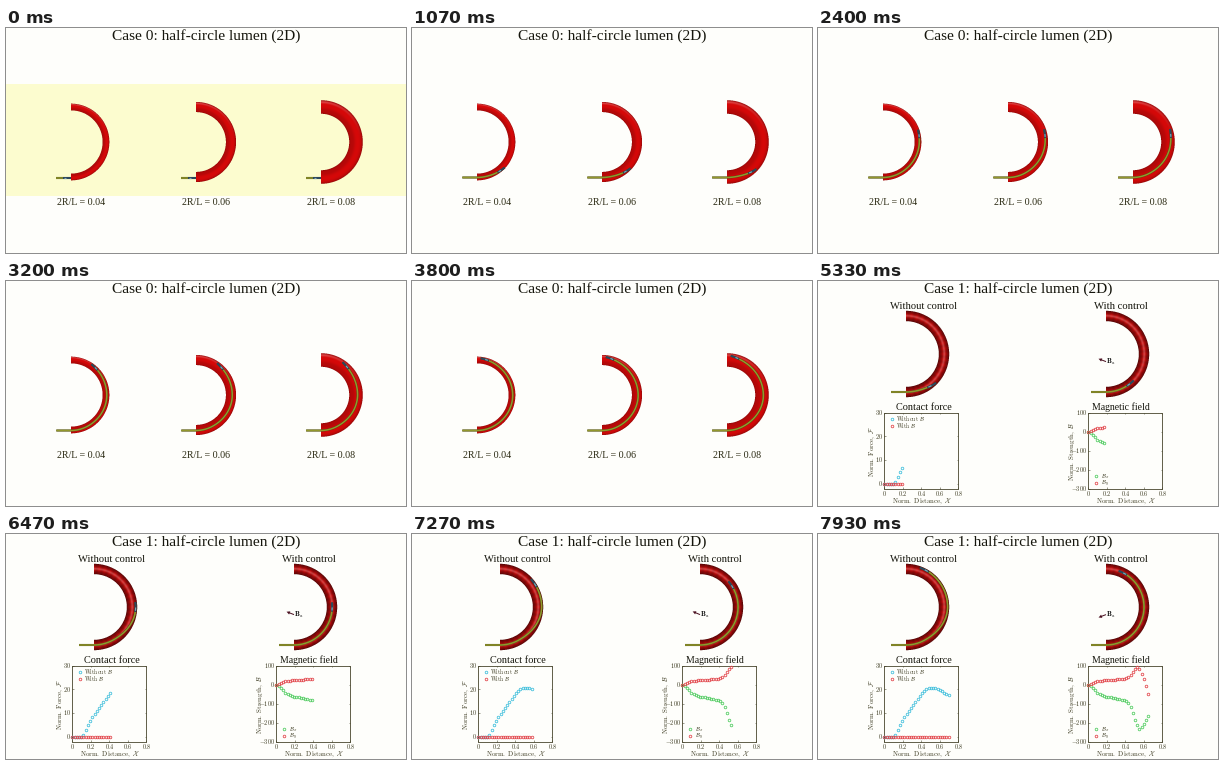
These frames come from a looping animation (400 px wide and 225 px high, 8 s). A matplotlib script:

```python
import numpy as np
import matplotlib.pyplot as plt
from matplotlib.animation import FuncAnimation
from matplotlib.patches import Polygon, Rectangle

W, H = 400, 225
PX = 0.72                      # points per pixel at 100 dpi
LOOP, STEP = 8000, 50
CUT = 4250                     # second case starts here
BG, INK, AXIS = "#fefefb", "#15150c", "#3d3b22"
OLIVE, TIP, LIGHT = "#93982c", "#2b4660", "#7aa6b4"
CYAN, RED, GREEN = "#40bfdc", "#e2474d", "#52cc62"

plt.rcParams["mathtext.fontset"] = "cm"
fig = plt.figure(figsize=(W / 100, H / 100), dpi=100, facecolor=BG)
ax = fig.add_axes([0, 0, 1, 1])
ax.set_xlim(0, W)
ax.set_ylim(H, 0)
ax.axis("off")


def keep(group, artist):
    group.append(artist)
    return artist


def text(group, x, y, s, size, ha="center", color=INK, **kw):
    kw.setdefault("va", "baseline")
    return keep(group, ax.text(x, y, s, fontsize=size * PX, ha=ha, color=color,
                               family="Liberation Serif", **kw))


def line(group, xs, ys, color, width, z=3):
    return keep(group, ax.plot(xs, ys, color=color, lw=width * PX, zorder=z,
                               solid_capstyle="butt")[0])


def rect(x0, y0, x1, y1, color, z):
    return ax.add_patch(
        Rectangle((x0, y0), x1 - x0, y1 - y0, fc=color, ec="none", zorder=z))


def smoothstep(v):
    v = np.clip(v, 0, 1)
    return v * v * (3 - 2 * v)


def smooth_tube(u, phi):
    red = 214 - 70 * np.abs(u) ** 4 - 28 * np.exp(-((u + 0.45) / 0.35) ** 2)
    shine = 60 * np.exp(-((u - 0.72) / 0.18) ** 2) * np.clip((phi - 1.7) / 1.4, 0, 1)
    return red + shine * 0.4, 8 + shine, 8 + shine


def ribbed_tube(u, phi):
    red = 128 + 88 * np.exp(-((u - 0.05) / 0.45) ** 2) - 45 * np.abs(u) ** 6
    red = red * (0.94 + 0.06 * np.cos(phi * 44))
    glow = 8 + 58 * np.exp(-((u - 0.05) / 0.22) ** 2)
    return red, glow, glow


def tube(group, cx, cy, R, h, shade, ss=4):
    """Shaded half ring, smoothed by supersampling."""
    n = int(R + h) + 3
    xs = (np.arange(n * ss) + 0.5) / ss
    ys = (np.arange(2 * n * ss) + 0.5) / ss - n
    X, Y = np.meshgrid(xs, ys)
    u = (np.hypot(X, Y) - R) / h
    inside = (np.abs(u) <= 1).astype(float)
    rgb = np.stack(shade(np.clip(u, -1, 1), np.arctan2(X, Y)), -1)
    img = np.concatenate([np.clip(rgb / 255, 0, 1) * inside[..., None],
                          inside[..., None]], -1)
    img = img.reshape(2 * n, ss, n, ss, 4).mean((1, 3))
    img[..., :3] /= np.maximum(img[..., 3:], 1e-6)
    keep(group, ax.imshow(img, extent=(cx, cx + n, cy + n, cy - n),
                          interpolation="nearest", aspect="auto", zorder=2))


class Catheter:
    """Rod pushed through a half ring; body and end set its outward lean."""

    def __init__(self, group, cx, cy, R, h, lead, body, end, tip):
        self.geo = cx, cy, R, h
        self.lead, self.body, self.end, self.tip = lead, body, end, tip
        self.rim = line(group, [], [], "#4a4814", 2.1, 4)
        self.rod = line(group, [], [], OLIVE, 1.5, 5)
        self.head = line(group, [], [], TIP, 1.9, 6)
        self.mark = line(group, [], [], LIGHT, 1.2, 7)

    def path(self, s, reach):
        cx, cy, R, h = self.geo
        phi = np.maximum(s, 0) / R
        lean = self.body * smoothstep((phi - 0.5) / 1.1)
        lean = lean + (self.end - lean) * np.exp(-(reach - s) / 14)
        r = R + h * lean * smoothstep(phi / 0.7)
        return cx + np.where(s < 0, s, r * np.sin(phi)), cy + r * np.cos(phi)

    def move(self, degrees):
        reach = np.radians(degrees) * self.geo[2]
        start = reach - self.tip
        for art, a, b in ((self.rim, -self.lead, reach), (self.rod, -self.lead, start),
                          (self.head, start, reach),
                          (self.mark, start + 1, start + self.tip * 0.45)):
            art.set_data(*self.path(np.linspace(a, b, 90), reach))


first, second = [], []

# Case 0: three tube widths
flash0 = [rect(0, 56, W, 168, "#fcfccf", 0)]
text(first, 200, 12.3, "Case 0: half-circle lumen (2D)", 15.4)
rods0 = []
for cx, h, ratio in ((64.8, 3.4, "0.04"), (189.8, 5.1, "0.06"), (314.6, 6.8, "0.08")):
    tube(first, cx, 114, 35, h, smooth_tube)
    rods0.append(Catheter(first, cx, 114.5, 35, h, 14.5, 0.25, 0.72, 8))
    text(first, cx + 10.3, 177.3, "2R/L = " + ratio, 10.05, color="#2a2912")

# Case 1: with and without control, and two charts
flash1 = [rect(0, 18.5, W, 131.5, "#f8f8bd", 0)]
flash1 += [rect(x, 125, x + 96, 132, "white", 1) for x in (50, 254)]
text(second, 200, 12.3, "Case 1: half-circle lumen (2D)", 15.4)
for x, y, s, size in ((105.3, 27.6, "Without control", 10.5), (303, 27.9, "With control", 10.6),
                      (106.3, 129.3, "Contact force", 10.2), (303.3, 129.3, "Magnetic field", 9.8)):
    text(second, x, y, s, size)
rods1 = []
for cx, body, end in ((88, 0.7, 0.7), (288, 0.0, 0.05)):
    tube(second, cx, 73, 38, 5.2, ribbed_tube)
    rods1.append(Catheter(second, cx, 73, 38, 5.2, 15, body, end, 9))


class Chart:
    def __init__(self, x0, low, high, step, label, gap, first_tick):
        self.x0, self.low, self.high = x0, low, high
        x1, top, bottom = x0 + 74, 131.7, 207.7
        line(second, [x0, x1, x1, x0, x0], [top, top, bottom, bottom, top], AXIS, 0.8)
        for v in np.arange(0, 0.81, 0.2):
            x = self.x(v)
            for y, d in ((top, 1.6), (bottom, -1.6)):
                line(second, [x, x], [y, y + d], AXIS, 0.5)
            text(second, x + 0.4, 214.8, "$%s$" % ("0" if v == 0 else "%.1f" % v), 6.3,
                 color=AXIS)
        for v in range(first_tick, high + 1, step):
            y = self.y(v)
            for x, d in ((x0, 1.6), (x1, -1.6)):
                line(second, [x, x + d], [y, y], AXIS, 0.5)
            minus = r"\mathrm{-}" if v < 0 else ""
            text(second, x0 - 1.6, y + 2.2, "$%s%d$" % (minus, abs(v)), 6.3, "right", AXIS)
        text(second, x0 + 37.3, 221.7, r"$\mathrm{Norm.\ Distance,}\ \mathcal{X}$", 6.8,
             color=AXIS)
        text(second, x0 - gap, 170.3, label, 6.8, color=AXIS, rotation=90, va="center")

    def x(self, v):
        return self.x0 + v / 0.8 * 74

    def y(self, v):
        return 207.7 - (v - self.low) / (self.high - self.low) * 76


def dots(group, color):
    return keep(group, ax.plot([], [], ls="", marker="o", ms=2.6 * PX, mfc="none", mec=color,
                               mew=0.8 * PX, zorder=5, snap=False)[0])


def legend(x, y, color, label):
    dots(live, color).set_data([x], [y])
    text(live, x + 5, y + 2, label, 5.8, "left", AXIS)


live = []                      # shown once the run has started
force = Chart(66.3, -2, 30, 10, r"$\mathrm{Norm.\ Force,}\ \mathcal{F}$", 11.8, 0)
field = Chart(270.4, -300, 100, 100, r"$\mathrm{Norm.\ Strength,}\ \mathcal{B}$", 16.5, -300)
legend(73.5, 138, CYAN, r"$\mathrm{Without}\ \mathcal{B}$")
legend(73.5, 145, RED, r"$\mathrm{With}\ \mathcal{B}$")
legend(278, 195, GREEN, r"$\mathcal{B}_x$")
legend(278, 202, RED, r"$\mathcal{B}_y$")


def curve(*points):
    xs, ys = zip(*points)
    return lambda v: np.interp(v, xs, ys)


push = curve((0, 0), (.11, 0), (.13, 1.5), (.16, 4.4), (.2, 7.5), (.25, 10.4), (.3, 13),
             (.35, 15.6), (.4, 18), (.44, 19.8), (.49, 20.6), (.54, 20.7), (.6, 19.7), (.71, 17.2))
bx = curve((0, 0), (.04, -12), (.1, -45), (.15, -58), (.2, -63), (.3, -72), (.4, -85),
           (.44, -98), (.48, -148), (.52, -208), (.55, -231), (.58, -224), (.62, -190),
           (.655, -160))
by = curve((0, 0), (.05, 11), (.1, 19), (.2, 24), (.3, 27), (.4, 33), (.45, 45),
           (.48, 68), (.535, 99), (.56, 75), (.6, 28), (.63, -15), (.655, -62))
none = curve((0, 0), (1, 0))
# chart, curve, markers, distance per ms
series = [(force, push, dots(second, CYAN), 0.000195), (force, none, dots(second, RED), 0.000195),
          (field, bx, dots(second, GREEN), 0.00018), (field, by, dots(second, RED), 0.00018)]

text(live, 288, 82.8, r"$\mathbf{B}_a$", 6.8, "left", "black")
shaft = line(live, [], [], "#4a1020", 1.0, 5)
barb = keep(live, ax.add_patch(Polygon(np.zeros((3, 2)), fc="#4a1020", ec="none", zorder=6)))


def point_arrow(v):
    d = np.array([bx(v), -by(v)])
    d = d / max(np.hypot(*d), 1e-6)
    n = np.array([-d[1], d[0]])
    root = np.array([288, 80.6])
    end = root + 8 * d
    shaft.set_data(*np.array([root, end - 2 * d]).T)
    barb.set_xy([end, end - 3.4 * d + 1.7 * n, end - 3.4 * d - 1.7 * n])


def show(group, on):
    for a in group:
        a.set_visible(on)


def draw(i):
    t = i * STEP
    run = t - CUT
    late = run >= 0
    show(first, not late)
    show(second, late)
    show(live, run > 0)
    show(flash0, t == 0)
    show(flash1, run == 0)
    if not late:
        for rod in rods0:
            rod.move(min(t * 0.0458, 178))
        return []
    for rod in rods1:
        rod.move(run * 0.044)
    for chart, f, marks, rate in series:
        xs = np.arange(0, run * rate, 0.024)
        marks.set_data(chart.x(xs), chart.y(f(xs)))
    point_arrow(run * 0.00018)
    return []


anim = FuncAnimation(fig, draw, frames=LOOP // STEP, interval=STEP,
                     init_func=lambda: draw(0), repeat=True, repeat_delay=0, blit=False)
plt.show()
```
